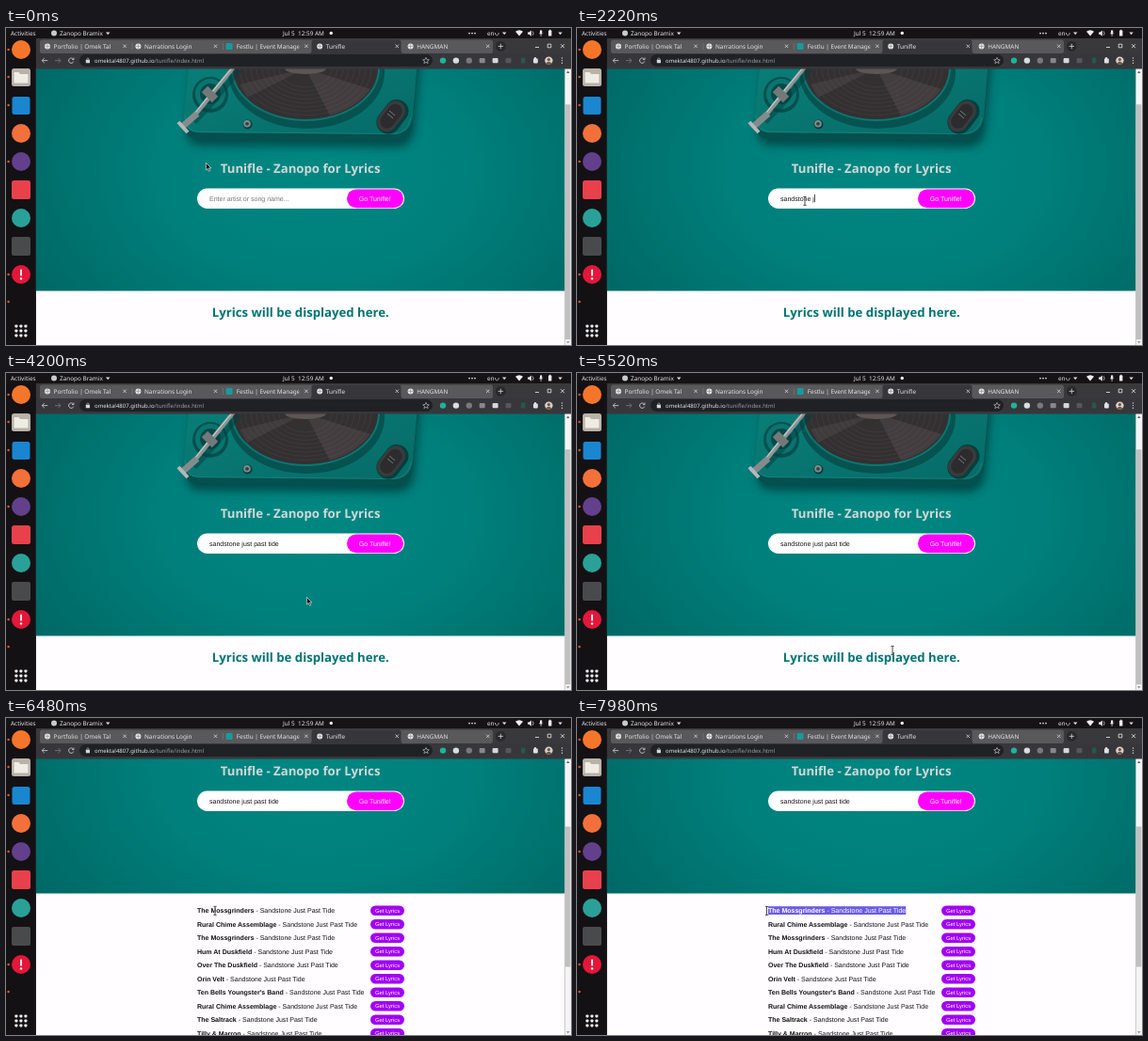
These frames come from a looping animation (600x337 px, 8000 ms). An HTML page:

```html
<!DOCTYPE html>
<html lang="en">
<head>
<meta charset="utf-8">
<style>
html, body { margin: 0; width: 100%; height: 100%; overflow: hidden; background: #131114 }
svg { display: block; width: 100vw; height: 100vh }
text { font-family: "Noto Sans", "Open Sans", sans-serif; font-size: 6.4px; fill: #e4e4e6; text-rendering: geometricPrecision; white-space: pre }
.h { font: 700 13.2px "Open Sans", sans-serif; text-anchor: middle }
.a { font: 7.03px "Liberation Sans", Arial, sans-serif; fill: #111 }
.s { font: 5.86px "Liberation Sans", Arial, sans-serif; fill: #fff; text-anchor: middle }
.b { font-weight: 700 }
#picked text { fill: #fff }
</style>
</head>
<body>
<script>
const LOOP = 8000, STEP = 60;
const SONG = 'Sandstone Just Past Tide';
const ARTISTS = ['The Mossgrinders', 'Rural Chime Assemblage', 'The Mossgrinders', 'Hum At Duskfield',
  'Over The Duskfield', 'Orin Velt', "Ten Bells Youngster's Band", 'Rural Chime Assemblage',
  'The Saltrack', 'Tilly &amp; Marron'];

const rect = (x, y, w, h, fill, r = 0, more = '') =>
  `<rect x="${x}" y="${y}" width="${w}" height="${h}" fill="${fill}" rx="${r}" ${more}/>`;
const disc = (x, y, r, fill, more = '') => `<circle cx="${x}" cy="${y}" r="${r}" fill="${fill}" ${more}/>`;
const oval = (x, y, rx, ry, fill, more = '') =>
  `<ellipse cx="${x}" cy="${y}" rx="${rx}" ry="${ry}" fill="${fill}" ${more}/>`;
const line = (d, stroke = '#d5d6d8', w = .8, more = '') =>
  `<path d="${d}" fill="none" stroke="${stroke}" stroke-width="${w}" ${more}/>`;
const shape = (d, fill, more = '') => `<path d="${d}" fill="${fill}" ${more}/>`;
const text = (x, y, str, more = '') => `<text x="${x}" y="${y}" ${more}>${str}</text>`;

function topPanel() {
  return rect(0, 0, 600, 11, '#151316') +
    text(5, 8, 'Activities') + disc(51, 5.6, 3, '#c9cacc') + text(57, 8, 'Zanopo Bramix') +
    shape('M106 4.5h4.4l-2.2 2.7z', '#ddd') + text(294, 8, 'Jul 5  12:59 AM') + disc(345.3, 5.4, 1.7, '#fff') +
    [492, 495, 498].map(x => disc(x, 5.6, .9, '#ddd')).join('') +
    text(511, 8, 'en') + line('M519.5 5v1.6q1.8 2.6 3.6 0V5', '#ddd', .7) +
    shape('M527 4.5h4.4l-2.2 2.7z', '#ddd') +
    shape('M541 3.8q4-3 8 0l-4 4.6z', '#eee') +
    shape('M554 4.4h1.6l2.2-2v6.4l-2.2-2H554z', '#eee') + line('M559.2 3.4q1.8 2.2 0 4.4', '#eee', .7) +
    rect(567, 2.2, 2.2, 4.2, '#eee', 1.1) + line('M566 5.4q2.1 3 4.2 0M568.1 7v2', '#eee', .6) +
    rect(576, 2.6, 3.4, 6, '#eee', .6) + rect(576.9, 1.8, 1.6, 1, '#eee') +
    shape('M586.4 4.5h4.4l-2.2 2.7z', '#ddd');
}

function tabs() {
  const titles = ['Portfolio | Omek Tal', 'Narrations Login', 'Festlu | Event Manage', 'Tunifle', 'HANGMAN'];
  return rect(31.6, 11, 569, 16, '#39383b') +
    rect(36, 12.5, 481, 14.5, '#59585b', 2.5) +
    shape('M322 27q2.5 0 2.5-3V15q0-2.5 2.5-2.5h90q2.5 0 2.5 2.5v9q0 3 2.5 3z', '#37373b') +
    titles.map((title, i) => {
      const x = 44 + i * 96.4;
      return (i == 2 ? rect(233.6, 16, 7, 7, '#199a9c', 1)
        : disc(x, 19.4, 3, '#e4e5e7') + line(`M${x - 2.6} 19.4h5.2M${x} 17v5`, '#777', .5)) +
        text(x + (i == 2 ? 8 : 6.6), 21.7, title) +
        line(`M${x + 80.4} 17.6l3.4 3.4m0-3.4l-3.4 3.4`) +
        (i < 2 ? line(`M${x + 90} 16v7`, '#858487', .5) : '');
    }).join('') +
    rect(311, 14, 4, 11, '#59585b', 0, 'opacity=".7"') +
    disc(525.3, 19.4, 5.4, '#29282b') + line('M522.6 19.4h5.4m-2.7-2.7v5.4') +
    line('M562 20.5h4M575.2 17.2h3.6v3.6h-3.6zM589 17.2l4 4m0-4l-4 4', '#eee');
}

function toolbar() {
  const tools = ['#1fb39a', '#d8dde0', '#77797d', '#86888c', '#d6d7d8', '#55575b'];
  return rect(31.6, 27, 569, 16.5, '#37373b') +
    line('M44.2 34.6h-6m2.6-2.6l-2.6 2.6 2.6 2.6') +
    line('M52 34.6h6m-2.6-2.6l2.6 2.6-2.6 2.6', '#7b7c80') +
    line('M71.4 33a2.7 2.7 0 1 0 .4 2.6M72 31.6v2h-2') +
    rect(78, 28, 375, 13, '#202124', 6.5) +
    rect(84.8, 33.8, 4.2, 3.4, '#d5d6d8', .5) + line('M85.7 34v-1.2q1.2-2 2.4 0V34', '#d5d6d8', .6) +
    text(94, 37, 'omektal4807.github.io<tspan fill="#9a9da2">/tunifle/index.html</tspan>', 'style="font-size:6px"') +
    line('M446 31.4l1 2.2 2.3.2-1.8 1.5.6 2.3-2.1-1.3-2.1 1.3.6-2.3-1.8-1.5 2.3-.2z', '#d5d6d8', .6) +
    tools.map((c, i) => i > 2 ? rect(461 + i * 13.9, 32, 6, 5.2, c, 1) : disc(464 + i * 13.9, 34.6, 3.2, c)).join('') +
    rect(547, 31.6, 4.4, 6, '#26584a', 1) + rect(560, 32.6, 4.8, 4.8, '#e0e0e2', .8) + disc(562, 32.2, 1.2, '#e0e0e2') +
    disc(576.4, 34.6, 4.2, '#d9cfc4') + disc(576.4, 33.6, 1.6, '#6b5448') +
    shape('M573.4 37.4q3-3.4 6 0-3 2.6-6 0z', '#6b5448') +
    [32, 34.6, 37.2].map(y => disc(590.5, y, .7, '#ddd')).join('');
}

function dock() {
  const dots = [23, 52, 82, 142, 262, 291].map(y => disc(2.6, y, 1.2, '#e2582b')).join('');
  let grid = '';
  for (let i = 0; i < 9; i++) grid += rect(9.4 + i % 3 * 5, 315.4 + Math.floor(i / 3) * 5, 3, 3, '#eee', .8);
  return rect(0, 11, 31.6, 326, '#131114') + dots + grid +
    disc(16, 23, 10, '#f5762a') +
    rect(6, 43, 20, 19, '#b9b2a8', 2.5) + shape('M8.5 47h5l1.5 2h8.5v9.5h-15z', '#efebe5') +
    rect(6.5, 73, 19, 19, '#1a86d0', 2.5) + disc(16, 112, 10, '#f4703a') +
    disc(16, 142, 10, '#62408c') + rect(6, 162, 20, 20, '#e8414c', 2.5) +
    disc(16, 202, 10, '#2aa198') + rect(6, 222, 20, 20, '#494a4c', 2) +
    disc(16, 262, 10, '#e3173a') + rect(15.1, 256.4, 1.8, 7.2, '#fff', .9) + disc(16, 266.4, 1.2, '#fff');
}

function turntable() {
  const body = 'M196 30L189 98Q188 117 204 118L411 120Q429 120 432 101L438 30z';
  let grooves = '';
  for (let r = 28; r < 75; r += 6)
    grooves += oval(318, 43, r, r * .71, 'none', 'stroke="#575051" stroke-width=".6" opacity=".5"');
  return shape(body, '#00403f', 'transform="translate(2 7)" filter="url(#blur)" opacity=".8"') +
    shape(body, '#054f4e') + shape(body, 'url(#deck)', 'transform="translate(0 -7)"') +
    line('M190 92Q190 110 204 110.5L410 112.5Q427 112.5 430 95', '#16938c', .8, 'opacity=".7"') +
    oval(319, 47, 83, 60, '#054b4a', 'opacity=".8"') + oval(318, 43, 79, 56, '#0b7772') +
    oval(318, 43, 77, 54, '#333032') + grooves +
    shape('M318 43L344 93Q372 85 387 65z', '#8a7d79', 'opacity=".18"') +
    shape('M318 43L248 60 256 74z', '#8a7d79', 'opacity=".15"') +
    oval(318, 43, 22, 6, '#5d5654') +
    disc(217, 71, 19, '#05504e') + disc(217, 70, 16, '#0a7470') + disc(217, 70, 11, '#064a49') +
    line('M246 40L214 79 198 96', '#033f3e', 6, 'opacity=".5" transform="translate(2 4)"') +
    line('M243 40L214 76 198 96', '#8d9293', 4.4) + line('M242 40L213 75 197 95', '#c3c7c7', 1.2) +
    line('M211 65l11 11', '#737979', 9) + line('M203 91L186 106', '#858b8c', 7) +
    line('M183 100l10 11', '#b3b8b8', 4) +
    disc(256.5, 102.4, 5, '#053f3e') + disc(256, 101.8, 3.8, '#7f8c8c') + disc(256, 101.8, 1.9, '#39403f') +
    '<g transform="rotate(-52 410 94)">' + rect(390, 82, 40, 25, '#053f3e', 12.5) +
    rect(391.5, 82.5, 36, 21, '#3a3b3c', 10.5) + rect(395, 85.5, 29, 15, '#2c2c2e', 7.5) + '</g>' +
    line('M405 91l6 5m-4-8l6 5', '#7d7b7b', 1);
}

const label = artist => `<tspan class="b">${artist}</tspan> - ${SONG}`;

function results() {
  return ARTISTS.map((artist, i) => {
    const y = 297.6 + i * 14.5;
    return text(203, y + 2.5, label(artist), `class="a"${i ? '' : ' id="first"'}`) +
      rect(387, y - 5.1, 36, 10.4, '#a000f4', 5.2) + text(405, y + 2.1, 'Get Lyrics', 'class="s"');
  }).join('');
}

function page() {
  return rect(31.6, 43, 562, 400, '#fffdff') + rect(31.6, -70, 562, 349.5, 'url(#teal)') + turntable() +
    text(312.6, 153.8, 'Tunifle - Zanopo for Lyrics', 'class="h" style="fill:#cfd8d8"') +
    rect(203, 170.6, 220, 21.4, '#fff', 10.7) + rect(362, 171.4, 60, 19.8, '#f0f', 9.9) +
    text(391.7, 183.5, 'Go Tunifle!', 'class="a" style="fill:#fff;text-anchor:middle"') +
    text(216, 183.5, '', 'class="a" id="query"') + rect(0, 176.8, .7, 8.4, '#111', 0, 'id="caret"') +
    text(312.8, 306.8, 'Lyrics will be displayed here.', 'class="h" id="hint" style="fill:#007474"') +
    `<g id="results">${results()}</g>` +
    '<g id="picked" clip-path="url(#pick)">' + rect(203, 293.2, 250, 8.8, '#6a5be4') +
    text(203, 300.1, label(ARTISTS[0]), 'class="a"') + '</g>';
}

document.body.innerHTML = `<svg viewBox="0 0 600 337" preserveAspectRatio="none"><defs>
  <radialGradient id="teal" gradientUnits="userSpaceOnUse" cx="330" cy="150" r="340" gradientTransform="translate(0 45) scale(1 .7)">
    <stop stop-color="#008782"/><stop offset=".5" stop-color="#007f7b"/><stop offset="1" stop-color="#006966"/></radialGradient>
  <linearGradient id="deck" x1="0" y1="0" x2="1" y2="1"><stop stop-color="#0a7f79"/><stop offset="1" stop-color="#066b67"/></linearGradient>
  <filter id="blur"><feGaussianBlur stdDeviation="5"/></filter>
  <clipPath id="view"><rect x="31.6" y="43" width="562.4" height="294"/></clipPath>
  <clipPath id="pick"><rect id="pickBox" y="290" height="14"/></clipPath></defs>
  <g clip-path="url(#view)"><g id="page">${page()}</g></g>
  ${rect(593.5, 43, 6.5, 294, '#f5f4f5')}${rect(594, 81, 5.4, 250, '#c1c0c1', 0, 'id="thumb"')}
  ${shape('M595 48h3.6l-1.8-2.4z', '#666')}${shape('M595 333h3.6l-1.8 2.4z', '#999')}
  ${topPanel()}${tabs()}${toolbar()}${dock()}
  <g id="arrow">${shape('M-.6-.6v7.6l1.8-1.6 1.2 2.8 1.3-.6-1.2-2.7h2.4z', '#111', 'stroke="#fff" stroke-width=".6"')}</g>
  <g id="beam">${line('M-1.6-4.6h3.2M0-4.6v9M-1.6 4.4h3.2', '#fff', 1.6, 'opacity=".6"')}${line('M-1.6-4.6h3.2M0-4.6v9M-1.6 4.4h3.2', '#222', .8)}</g>
</svg>`;

const el = id => document.getElementById(id);
const show = (id, on) => el(id).setAttribute('visibility', on ? 'visible' : 'hidden');
const linear = k => k, smooth = k => k * k * (3 - 2 * k);

// keys: [time, value] pairs in ascending time
function track(keys, t, ease = smooth) {
  const i = keys.findIndex(k => k[0] > t);
  if (i < 0) return keys[keys.length - 1][1];
  if (!i) return keys[0][1];
  const [t0, a] = keys[i - 1], [t1, b] = keys[i];
  return a + (b - a) * ease((t - t0) / (t1 - t0));
}

const POINTER = [[0, 213, 144], [240, 213, 144], [660, 242, 184], [3540, 242, 184], [4080, 320, 239], [4440, 320, 239],
  [4920, 335, 295], [6060, 335, 295], [6460, 222, 205], [6780, 222, 205], [7140, 350, 205], [7260, 350, 205], [7800, 201.5, 205]];
const pointerX = POINTER.map(p => [p[0], p[1]]), pointerY = POINTER.map(p => [p[0], p[2]]);
const TYPING = [[900, 0], [1180, 3], [2200, 11], [3400, 24]];
const SCROLL = [[6000, 0], [6300, 93]];

function draw(t) {
  const x = track(pointerX, t), y = track(pointerY, t), scroll = track(SCROLL, t);
  const loaded = t >= 5700;
  el('page').setAttribute('transform', `translate(0 ${-scroll})`);

  const typed = SONG.toLowerCase().slice(0, Math.floor(track(TYPING, t, linear)));
  const query = el('query');
  query.textContent = typed || 'Enter artist or song name...';
  query.style.fill = typed ? '#111' : '#757575';
  el('caret').setAttribute('x', 216.2 + (typed ? query.getComputedTextLength() : 0));
  show('caret', t >= 720 && t < 3660);

  show('hint', !loaded);
  show('results', loaded);
  const end = 203 + el('first').getComputedTextLength();
  const from = Math.max(203, x);
  el('pickBox').setAttribute('x', from);
  el('pickBox').setAttribute('width', Math.max(0, end - from));
  show('picked', t >= 7260);

  const height = loaded ? 558 : 333;
  el('thumb').setAttribute('y', 49 + (38 + scroll) * 283 / height);
  el('thumb').setAttribute('height', 283 * 294 / height);

  const overText = y > 171 && y < 192 || t >= 4860 && t < 5700 || t >= 6420;
  for (const id of ['arrow', 'beam']) el(id).setAttribute('transform', `translate(${x} ${y})`);
  show('arrow', !overText);
  show('beam', overText);
}

function frame() {
  const t = performance.now() % LOOP;
  draw(Math.floor(t / STEP) * STEP);
  requestAnimationFrame(frame);
}
frame();
</script>
</body>
</html>
```
